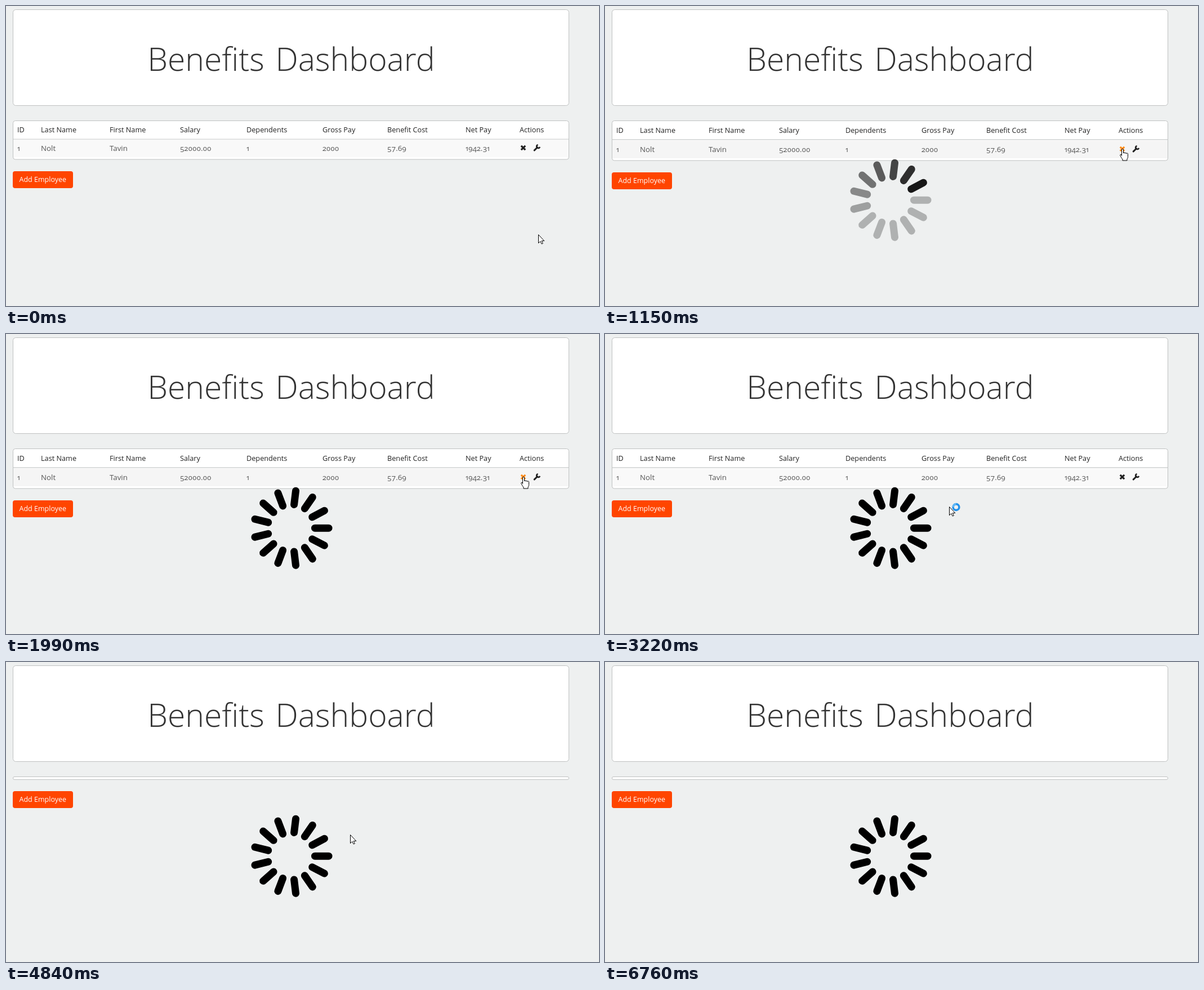
An HTML page that plays this animation: 1053 px wide and 532 px high, repeating every 6.84 s.

```html
<!DOCTYPE html>
<html lang="en">
<head>
<meta charset="utf-8">
<title>Benefits Dashboard</title>
<style>
  html, body { margin: 0; width: 100%; height: 100%; overflow: hidden; background: #eef0f0; }
  svg { display: block; width: 1053px; height: 532px; font-family: "Open Sans", "Noto Sans", sans-serif; }
  .box { fill: #fff; stroke: #bfc1c1; }
  .title { font-size: 57px; font-weight: 360; word-spacing: 5px; fill: #333; }
  .head { font-size: 12.7px; fill: #222; }
  .cells { font-size: 13.3px; fill: #555; font-variant-numeric: oldstyle-nums; }
  .label { font-size: 12.5px; fill: #fff; }
  .spoke { stroke: #000; stroke-width: 13; stroke-linecap: round; }
  .pointer { fill: #fff; stroke: #000; stroke-linejoin: round; }
</style>
</head>
<body>
<svg viewBox="0 0 1053 532">
  <rect class="box" x="12.5" y="6.5" width="987" height="170" rx="5"/>
  <text class="title" x="506.5" y="115" text-anchor="middle">Benefits Dashboard</text>

  <rect id="table" class="box" x="12.5" y="203.5" width="987"/>
  <g id="head" class="head"></g>
  <rect id="rule" x="13" y="235.5" width="986" fill="#dadcdc"/>
  <g id="row">
    <rect id="stripe" x="13" y="237" width="986" height="31"/>
    <g id="cells" class="cells"></g>
    <path id="remove" d="M914.8 247.8l7.4 7.4m0-7.4l-7.4 7.4" stroke-width="3.2"/>
    <path d="M938.3 255.9l5.2-5.2" stroke="#222" stroke-width="3" stroke-linecap="round"/>
    <path d="M944.6 246.2a2.9 2.9 0 1 0 3.3 3.6" fill="none" stroke="#222" stroke-width="2.6"/>
  </g>

  <g id="button">
    <rect x="12" width="107" height="30" rx="4" fill="#ff4500"/>
    <text class="label" x="23.5" y="19">Add Employee</text>
  </g>

  <g id="spinner" transform="translate(506.5 344.2)"></g>

  <g id="cursor">
    <path id="arrow" class="pointer" d="M0 0v15l3.4-3.2 2.3 4.7 2.2-1-2.2-4.5h4.6z"/>
    <path id="hand" class="pointer" d="M-1.5 12V1.5a1.5 1.5 0 0 1 3 0v6a1.4 1.4 0 0 1 2.8.3a1.4 1.4 0 0 1 2.7.6a1.3 1.3 0 0 1 2.5.8V14q0 2-1.5 4v2.5H0v-2q-1.5-2-4-6.5q-.8-2 .8-2.2t1.7 2.2z"/>
    <g id="busy" fill="none" stroke-width="3.6">
      <circle cx="12" cy="0.5" r="5.4" stroke="#2492ea"/>
      <path d="M6.6 0.5a5.4 5.4 0 0 1 5.4-5.4" stroke="#62b8f5"/>
    </g>
  </g>
</svg>
<script>
const LOOP = 6840, SPOKES = 13;
const $ = id => document.getElementById(id);
const set = (id, attrs) => { for (const k in attrs) $(id).setAttribute(k, attrs[k]); };
const show = (id, on) => set(id, { visibility: on ? "visible" : "hidden" });

function add(parent, tag, attrs, text = "") {
  const el = document.createElementNS("http://www.w3.org/2000/svg", tag);
  for (const k in attrs) el.setAttribute(k, attrs[k]);
  el.textContent = text;
  $(parent).append(el);
  return el;
}

const wide = [20, 62, 184, 309, 427, 562, 677, 816, 912];
const narrow = [20, 64, 191, 321, 404, 544, 663, 807, 908];
const heads = ["ID", "Last Name", "First Name", "Salary", "Dependents", "Gross Pay", "Benefit Cost", "Net Pay", "Actions"]
  .map((s, i) => add("head", "text", { x: wide[i], y: 223.5 }, s));
["1", "Nolt", "Tavin", "52000.00", "1", "2000", "57.69", "1942.31"]
  .forEach((s, i) => add("cells", "text", { x: wide[i], y: 256.5 }, s));

const spokes = Array.from({ length: SPOKES }, (_, i) =>
  add("spinner", "line", { class: "spoke", x1: 42, x2: 66.5, transform: `rotate(${i * 360 / SPOKES})` }));

// Each move: first step, last step, number of steps, end point
const moves = [
  [70, 500, 7, 918.5, 261.5],
  [730, 980, 4, 919, 253.5],
  [2370, 2670, 5, 611.5, 306.5],
  [5070, 5680, 9, 843.5, 459.5],
  [5760, 5990, 4, 929, 535]
];

function cursorAt(t) {
  let x = 945.5, y = 405.5;
  for (const [from, to, steps, endX, endY] of moves) {
    if (t < from) break;
    const done = Math.min(steps, Math.floor((t - from) / (to - from) * (steps - 1) + 1e-6) + 1);
    x += (endX - x) * done / steps;
    y += (endY - y) * done / steps;
  }
  return [x, y];
}

// Translucent spinner pictures pile up until every spoke is black
function spokeOpacity(i, steps) {
  let light = 1;
  for (let n = 0; n < steps; n++) {
    const lag = (SPOKES - 1 + n - i + SPOKES) % SPOKES;
    light *= 1 - Math.max(0.26, 0.9 - 0.095 * lag);
  }
  return light < 0.03 ? 1 : 1 - light;
}

function draw(t) {
  const loading = t >= 1150, removed = t >= 4150, empty = t >= 4220;
  const bottom = empty ? 208.5 : removed ? 242 : loading ? 274 : 272;
  set("table", { height: bottom - 203.5, rx: empty ? 2.5 : 4 });
  set("button", { transform: `translate(0 ${Math.round(bottom + 20.5)})` });

  show("head", !empty);
  show("rule", !empty);
  set("head", { transform: `translate(0 ${loading ? 1 : 0})` });
  set("rule", { height: loading ? 2 : 1.5, y: loading ? 236 : 235.5 });
  heads.forEach((h, i) => h.setAttribute("x", (removed ? narrow : wide)[i]));

  const [x, y] = cursorAt(t);
  const onLink = t >= 730 && t < 2370;
  show("row", !removed);
  set("row", { transform: `translate(0 ${loading ? 2 : 0})` });
  set("stripe", { fill: t < 2370 && y < 270 ? "#f5f5f5" : "#f9f9f9" });
  set("remove", { stroke: onLink ? "#ff8c1a" : "#222" });

  const steps = loading ? Math.min(15, Math.floor((t - 1150) / 76.5) + 1) : 0;
  spokes.forEach((s, i) => s.setAttribute("opacity", spokeOpacity(i, steps)));

  set("cursor", { transform: `translate(${x} ${y})` });
  show("arrow", !onLink);
  show("hand", onLink);
  show("busy", t >= 2900 && t < 4840);
}

function tick() {
  draw(performance.now() % LOOP);
  requestAnimationFrame(tick);
}
tick();
</script>
</body>
</html>
```
